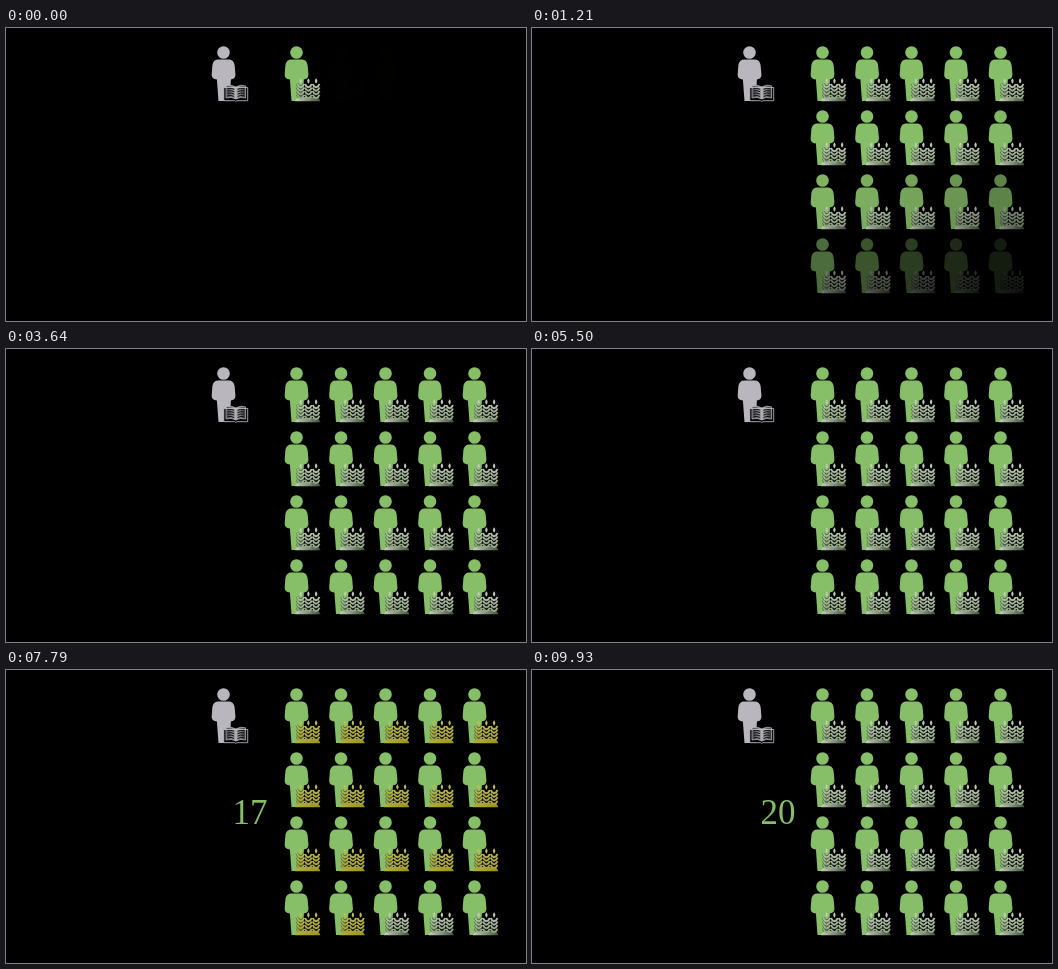
These frames come from a looping animation (520x293 px, 10 s). An HTML page with a canvas:

```html
<!DOCTYPE html>
<html lang="en">
<head>
<meta charset="utf-8">
<style>
  html, body { margin: 0; width: 100%; height: 100%; overflow: hidden; background: #000; }
  canvas { display: block; }
</style>
</head>
<body>
<canvas id="stage" width="520" height="293"></canvas>
<script>
const ctx = document.getElementById('stage').getContext('2d');
const LOOP = 10000, COUNT = 20, COLUMNS = 5;
const FADE = { lead: 80, lag: 52.6, duration: 1053 };
const COUNTING = { start: 6140, step: 100 };
const REVERT = { start: 8350, duration: 1000 };
const GREEN = '#87be68', GRAY = '#b9b7bd';
const PALE = [[196, 206, 188], [146, 164, 136]];
const GOLD = [[194, 188, 92], [170, 162, 58]];
const GROUND_PALE = [[190, 202, 182], [66, 80, 60]];
const GROUND_GOLD = [[178, 174, 52], [150, 144, 30]];

const clamp = v => Math.min(1, Math.max(0, v));
const sigmoid = v => 1 / (1 + Math.exp(-v));

function smooth(v) {
  const edge = sigmoid(-5);
  return clamp((sigmoid(10 * (clamp(v) - 0.5)) - edge) / (1 - 2 * edge));
}

function mix(a, b, k) {
  return `rgb(${a.map((v, i) => Math.round(v + (b[i] - v) * k))})`;
}

// Coordinates are relative to the centre of the head.
const body = new Path2D(
  'M-5 7H5C8.6 7 10.6 9 11.1 12.6L11.9 21.5Q12.2 25.6 9 26.6L7.4 27L6.2 48.5H-5' +
  'L-6.6 27L-9 26.4Q-12.1 25.4-11.8 21.5L-11.1 12.6C-10.6 9-8.6 7-5 7Z');

const leaves = new Path2D();
const tips = new Path2D();
for (const x of [4.2, 11.9, 19.6]) {
  for (let y = 34; y < 46; y += 3.6) {
    leaves.moveTo(x - 3.3, y - 2.6);
    leaves.quadraticCurveTo(x - 2.6, y, x, y + 0.8);
    leaves.quadraticCurveTo(x + 2.6, y, x + 3.3, y - 2.6);
  }
  tips.moveTo(x, 25.8);
  tips.quadraticCurveTo(x + 2.5, 28.6, x, 31.2);
  tips.quadraticCurveTo(x - 2.5, 28.6, x, 25.8);
}
const ground = new Path2D('M-1.5 48.7Q-0.6 44.8 6 44.6L18 44.4Q23 44.6 23.8 48.7Z');

const cover = new Path2D('M0.3 35H24.2V48.2H13.4L12.3 49L11.2 48.2H0.3Z');
const pages = new Path2D(
  'M12.3 46.5V34.4Q7 31.5 2.5 33.4V45.5Q8 43.8 12.3 46.5Q16.6 43.8 22.1 45.5V33.4Q17.6 31.5 12.3 34.4');
const lines = new Path2D();
for (let y = 36; y < 44; y += 2.4) {
  lines.moveTo(4.2, y);
  lines.quadraticCurveTo(7.5, y - 0.9, 10.6, y + 0.8);
  lines.moveTo(14, y + 0.8);
  lines.quadraticCurveTo(17.2, y - 0.9, 20.4, y);
}

function stroke(path, color, width) {
  ctx.strokeStyle = color;
  ctx.lineWidth = width;
  ctx.stroke(path);
}

function gradient(x0, y0, x1, y1, colors) {
  const shade = ctx.createLinearGradient(x0, y0, x1, y1);
  colors.forEach((c, i) => shade.addColorStop(i / (colors.length - 1), c));
  return shade;
}

function person(color) {
  ctx.fillStyle = color;
  ctx.beginPath();
  ctx.arc(0, 0, 6.3, 0, 2 * Math.PI);
  ctx.fill();
  ctx.fill(body);
}

function book() {
  ctx.fillStyle = '#000';
  ctx.fill(cover);
  ctx.fillStyle = gradient(2, 0, 23, 0, ['#3a3a3c', '#aaa9ae', '#2c2c2e']);
  ctx.fill(pages);
  stroke(lines, '#08080a', 0.9);
  stroke(cover, '#c4c3c8', 0.8);
  stroke(pages, '#c4c3c8', 0.7);
}

function wheat(gold) {
  const blend = (from, to) => from.map((c, i) => mix(c, to[i], gold));
  const grain = gradient(0, 26, 0, 46, blend(PALE, GOLD));
  stroke(leaves, 'rgba(16,28,10,.6)', 3);
  ctx.fillStyle = gradient(0, 0, 24, 0, blend(GROUND_PALE, GROUND_GOLD));
  ctx.fill(ground);
  stroke(leaves, grain, 1.8);
  ctx.fillStyle = grain;
  ctx.fill(tips);
}

function at(x, y, draw) {
  ctx.save();
  ctx.translate(x, y);
  draw();
  ctx.restore();
}

function farmer(index, opacity, gold) {
  const x = 290.5 + 44.5 * (index % COLUMNS);
  const y = 24.5 + 64 * Math.floor(index / COLUMNS);
  at(x, y, () => {
    person(GREEN);
    wheat(gold);
    ctx.fillStyle = `rgba(0,0,0,${1 - opacity})`;
    ctx.fillRect(-14, -8, 40, 59);
  });
}

function counter(value) {
  ctx.font = '35px "Liberation Serif", serif';
  ctx.fillStyle = GREEN;
  ctx.fillText(value, 229.5 + ctx.measureText(value).actualBoundingBoxLeft, 153.7);
}

function render(t) {
  ctx.fillStyle = '#000';
  ctx.fillRect(0, 0, 520, 293);
  at(217.5, 24.5, () => {
    person(GRAY);
    book();
  });

  const counted = Math.min(COUNT, Math.floor((t - COUNTING.start) / COUNTING.step) + 1);
  const gold = 1 - smooth((t - REVERT.start) / REVERT.duration);
  for (let i = 0; i < COUNT; i++) {
    const begin = FADE.lag * (i - 1) - FADE.lead;
    const opacity = i ? smooth((t - begin) / FADE.duration) : 1;
    if (opacity > 0) farmer(i, opacity, i < counted ? gold : 0);
  }
  if (counted > 0) counter(String(counted));
}

const origin = performance.now();
function tick() {
  render((performance.now() - origin) % LOOP);
  requestAnimationFrame(tick);
}
tick();
</script>
</body>
</html>
```
